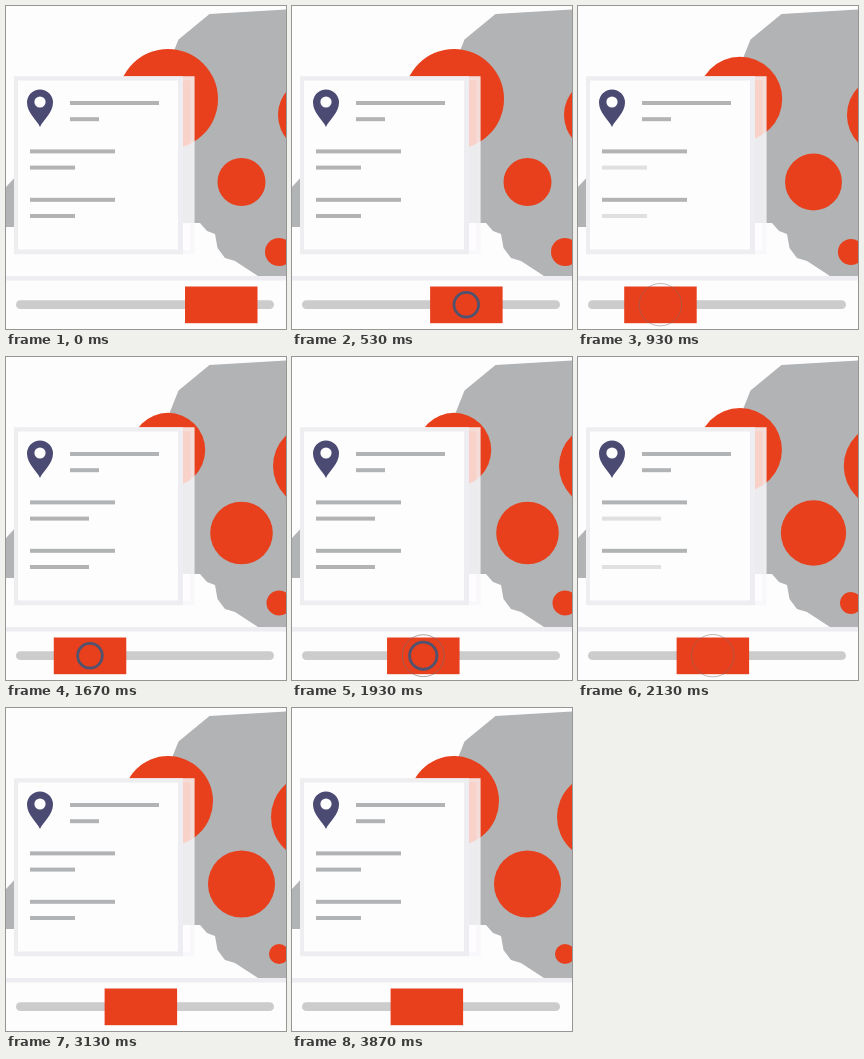
Write an HTML page with a canvas that moves like this. It is 280 px wide and 323 px high and loops after 3.94 s.

```html
<!DOCTYPE html>
<html lang="en">
<head>
<meta charset="utf-8">
<title>Map slider</title>
<style>
html, body { margin: 0; width: 100%; height: 100%; overflow: hidden; background: #fefdfe; }
canvas { display: block; width: 280px; height: 323px; }
</style>
</head>
<body>
<canvas id="stage"></canvas>
<script>
const W = 280, H = 323, LOOP = 3940, STEP = 1000 / 15;
const WHITE = '#fefdfe', GREY = '#b1b3b5', RED = '#e8401c', EDGE = '#eeedf1', NAVY = '#4b4a73';
const canvas = document.getElementById('stage');
const dpr = window.devicePixelRatio || 1;
canvas.width = W * dpr;
canvas.height = H * dpr;
const ctx = canvas.getContext('2d');
ctx.scale(dpr, dpr);

// The slider is dragged twice, so every moving value has three stops.
const drags = [447, 1647];
const handleStops = [179, 46.2, 98.6];
const bubbles = [
  { x: 162, y: 93, stops: [50, 37.2, 45] },
  { x: 235.5, y: 176, stops: [24, 31.3, 33.5] },
  { x: 309, y: 109, stops: [37, 42, 44] },
  { x: 273, y: 246, stops: [14, 12.5, 10] }
];
const coast = [[194, 217], [201, 225], [209, 228], [211.5, 242], [219, 252], [229, 255], [252, 270]];

const span = (t, a, b) => Math.min(1, Math.max(0, (t - a) / (b - a)));

// cubic-bezier(.25, .1, .25, 1)
function ease(x) {
  if (x <= 0 || x >= 1) return x;
  let lo = 0, hi = 1;
  for (let i = 0; i < 20; i++) {
    const m = (lo + hi) / 2;
    if (0.75 * m * (1 - m) + m ** 3 < x) lo = m; else hi = m;
  }
  return 0.3 * hi * (1 - hi) ** 2 + 3 * hi * hi * (1 - hi) + hi ** 3;
}

function follow(stops, t, delay, length) {
  return drags.reduce((v, start, i) =>
    v + (stops[i + 1] - stops[i]) * ease(span(t - start, delay, delay + length)), stops[0]);
}

function rect(x, y, w, h, color) {
  ctx.fillStyle = color;
  ctx.fillRect(x, y, w, h);
}

function disc(x, y, r, color) {
  ctx.fillStyle = color;
  ctx.beginPath();
  ctx.arc(x, y, r, 0, Math.PI * 2);
  ctx.fill();
}

function ring(x, r, width, color, alpha) {
  ctx.globalAlpha = alpha;
  ctx.strokeStyle = color;
  ctx.lineWidth = width;
  ctx.beginPath();
  ctx.arc(x, 298.7, r, 0, Math.PI * 2);
  ctx.stroke();
  ctx.globalAlpha = 1;
}

function poly(points) {
  ctx.fillStyle = GREY;
  ctx.beginPath();
  points.forEach(p => ctx.lineTo(...p));
  ctx.fill();
}

function drawMap(t) {
  poly([[W, 3.5], [203.5, 8], [172.5, 33.5], [150, 90], [150, 217], ...coast, [W, 270]]);
  poly([[0, 181], [12, 168], [12, 221], [0, 221]]);
  for (const b of bubbles) disc(b.x, b.y, follow(b.stops, t, 335, 430), RED);
}

function drawPin() {
  ctx.fillStyle = NAVY;
  ctx.beginPath();
  ctx.moveTo(34, 121);
  ctx.bezierCurveTo(31, 114, 21, 107, 21, 96.5);
  ctx.arc(34, 96.5, 13, Math.PI, 0);
  ctx.bezierCurveTo(47, 107, 37, 114, 34, 121);
  ctx.fill();
  disc(34, 96, 5.6, WHITE);
}

// The short lines fade out, change width, and fade back in.
function drawLines(t) {
  const fades = drags.map(s => span(t - s, 370, 755));
  const shown = fades.reduce((v, u) => v * Math.abs(2 * u - 1), 1);
  const wide = fades[0] >= 0.5 && fades[1] < 0.5;
  for (let i = 0; i < 3; i++) {
    const x = i ? 24 : 64, y = 95 + 48.4 * i;
    rect(x, y, i ? 85 : 89, 4, GREY);
    if (i) ctx.globalAlpha = shown;
    rect(x, y + 16.2, i ? (wide ? 59 : 45) : 29, 4, GREY);
    ctx.globalAlpha = 1;
  }
}

function drawCard(t) {
  rect(8, 70.3, 180.5, 178, 'rgba(254,253,254,.77)');
  rect(8, 70.3, 169, 178, EDGE);
  ctx.strokeStyle = 'rgba(238,237,241,.4)';
  ctx.lineWidth = 4;
  ctx.strokeRect(10, 72.3, 176.5, 174);
  rect(12, 74.5, 160, 169, WHITE);
  drawPin();
  drawLines(t);
}

function drawSlider(t) {
  rect(0, 270, W, 4.5, EDGE);
  ctx.fillStyle = '#cccccd';
  ctx.beginPath();
  ctx.roundRect(10, 294.3, 258, 8.7, 4.35);
  ctx.fill();
  const x = follow(handleStops, t, 0, 420), mid = x + 36.2;
  rect(x, 280.5, 72.5, 36.7, RED);
  for (const s of drags) {
    const age = t - s;
    if (age < 0) continue;
    const grow = span(age, 180, 290);
    ring(mid, 12.3 + 1.4 * grow, 2.8, '#50536f', 1 - span(age, 330, 470));
    ring(mid, 14 + 7.2 * grow, 0.8, '#77686c', 0.8 * grow * (1 - span(age, 460, 560)));
  }
}

function draw(now) {
  const t = Math.floor((now % LOOP + 4) / STEP) * STEP;
  rect(0, 0, W, H, WHITE);
  drawMap(t);
  drawCard(t);
  drawSlider(t);
}

let begin;
function tick(now) {
  begin ??= now;
  draw(now - begin);
  requestAnimationFrame(tick);
}
draw(0);
requestAnimationFrame(tick);
</script>
</body>
</html>
```
